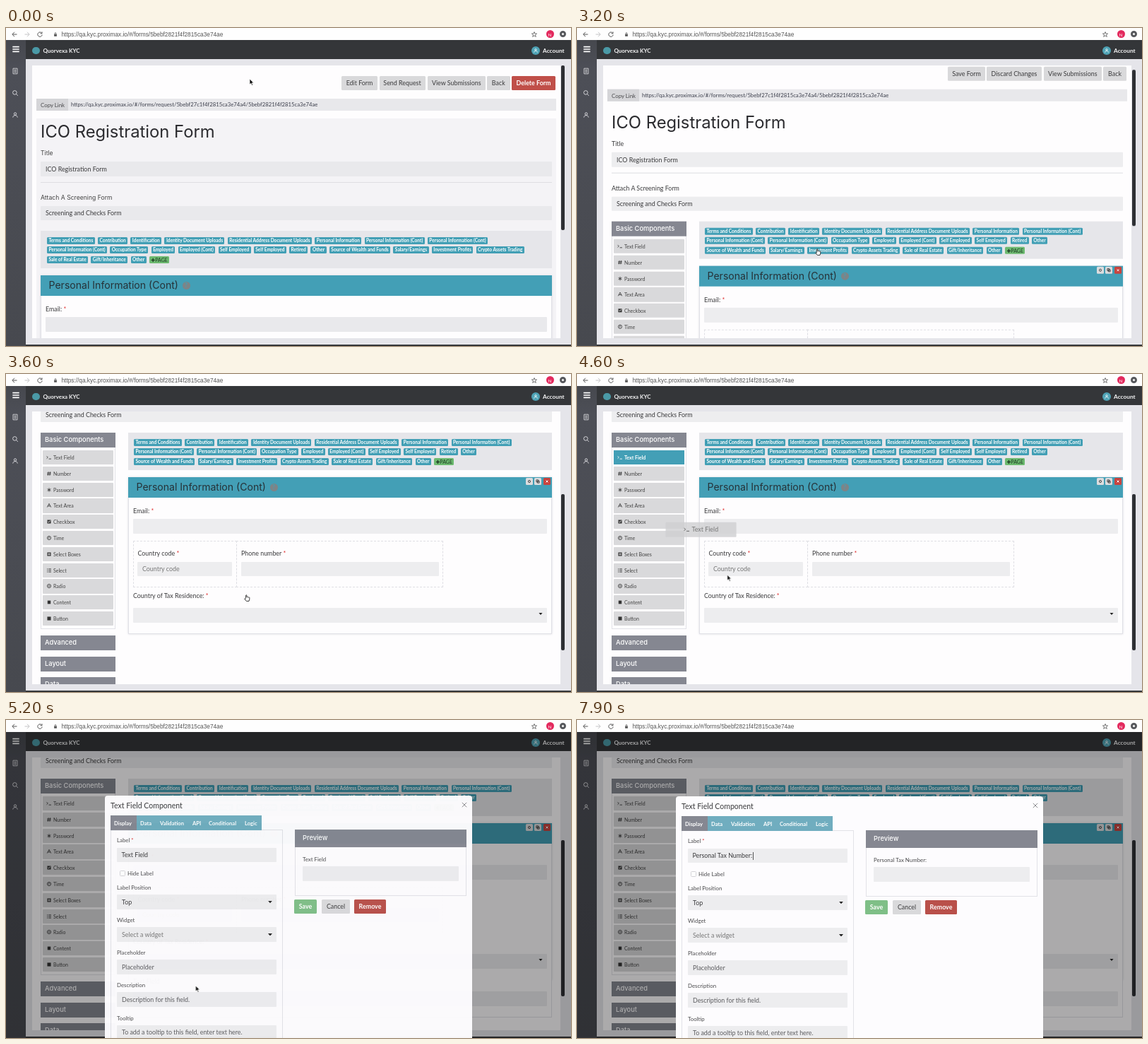
An HTML page that plays this animation: 800x450 px, repeating every 8000 ms.

```html
<!DOCTYPE html>
<html lang="en">
<head>
<meta charset="utf-8">
<title>Form builder</title>
<style>
html, body { margin: 0; width: 100%; height: 100%; overflow: hidden; background: #fff; }
#stage { position: absolute; left: 0; top: 0; width: 800px; height: 450px; overflow: hidden; font: 8.9px Lato, "Open Sans", sans-serif; color: #3a3a3c; }
#stage div, #stage span, #stage svg { position: absolute; box-sizing: border-box; }
#stage span { line-height: 20px; white-space: pre; }
svg { overflow: visible; }
.fill { left: 0; top: 0; width: 800px; height: 450px; }

.url { font: 8.29px "Liberation Sans", Arial, sans-serif; color: #555; }
.brand { font-size: 7.9px; font-weight: 700; color: #f4f4f5; }
.account { font-size: 8.3px; font-weight: 700; color: #f4f4f5; }
.link { font-size: 7.72px; color: #3c3f4c; }
.h1 { font: 23.8px Inter, "Open Sans", sans-serif; color: #2b2b2f; }
.h2 { font: 14.07px Inter, "Open Sans", sans-serif; color: #263238; }
.h3 { font: 500 9.3px Inter, "Open Sans", sans-serif; color: #fff; }
.soft { font: 8.65px Inter, "Open Sans", sans-serif; color: #444; }
.item { font-size: 7px; color: #444; }
.small { font-size: 7.87px; color: #4a4a4c; }
.tab { font-size: 7.6px; font-weight: 700; color: #fff; }
.title { font-size: 10.55px; }
.help { font-size: 8.5px; font-weight: 700; color: #439fb6; }
.hint { color: #777; }
.faint { color: #5c5c5f; }
.light { color: #fff; font-weight: 700; }
i { color: #d22; font-style: normal; }

.row { display: flex; gap: 4.3px; height: 10px; }
.row b { padding: 0 2.4px; border-radius: 1.5px; background: #429fb5; color: #fff; font-size: 6.55px; line-height: 10px; white-space: nowrap; }
.row .add { background: #6dba70; color: #1f3a24; font-weight: 400; font-size: 7px; }

#view, #edit, #hot, #added, #ghost, #arrow, #hand { animation: 8s step-end infinite; }
#view { animation-name: view; }
#edit { animation-name: edit; }
#hot { animation-name: hot; }
#added { animation-name: added; }
#ghost { animation: ghost 8s step-end infinite, drag 8s linear infinite; }
#arrow { animation-name: arrow; }
#hand { animation-name: hand; }
#scroll { animation: scroll 8s infinite; }
#thumb { animation: thumb 8s infinite, shrink 8s step-end infinite; }
#pointer { animation: pointer 8s infinite ease-in-out; }
#shade { animation: shade 8s linear infinite; }
#dialog { animation: dialog 8s infinite; }

@keyframes view { 0% { visibility: visible } 17.5%, 100% { visibility: hidden } }
@keyframes edit { 0% { visibility: hidden } 17.5%, 100% { visibility: visible } }
@keyframes hot { 0% { visibility: hidden } 52% { visibility: visible } 59.2%, 100% { visibility: hidden } }
@keyframes added { 0% { visibility: hidden } 59.2%, 100% { visibility: visible } }
@keyframes ghost { 0% { visibility: hidden } 54.4% { visibility: visible } 59.2%, 100% { visibility: hidden } }
@keyframes drag {
  0%, 54.4% { transform: none }
  57.5% { transform: translate(73px, 101px) }
  59.2%, 100% { transform: translate(150px, 215px) }
}
@keyframes arrow {
  0% { visibility: visible } 33.75% { visibility: hidden }
  47% { visibility: visible } 78.4%, 100% { visibility: hidden }
}
@keyframes hand { 0% { visibility: hidden } 33.75% { visibility: visible } 47%, 100% { visibility: hidden } }
@keyframes scroll {
  0%, 38.2% { transform: none; animation-timing-function: ease-in }
  40% { transform: translateY(-13px); animation-timing-function: cubic-bezier(.3, .2, .5, 1) }
  45%, 100% { transform: translateY(-204px) }
}
@keyframes thumb {
  0%, 38.2% { transform: none; animation-timing-function: ease-in }
  40% { transform: translateY(6px); animation-timing-function: cubic-bezier(.3, .2, .5, 1) }
  45%, 100% { transform: translateY(117px) }
}
@keyframes shrink { 0% { height: 233px } 22.5%, 100% { height: 221px } }
@keyframes pointer {
  0% { transform: translate(345px, 72px) }
  11.5%, 22.5% { transform: translate(497.5px, 79px) }
  33.75%, 46.25% { transform: translate(340px, 313px) }
  52.2%, 54.2% { transform: translate(88px, 115px); animation-timing-function: ease-in }
  57.5% { transform: translate(212px, 283px); animation-timing-function: ease-out }
  59.2%, 68.5% { transform: translate(268.5px, 376px) }
  74%, 100% { transform: translate(208px, 189px) }
}
@keyframes shade { 0%, 59.4% { opacity: 0 } 64%, 100% { opacity: 1 } }
@keyframes dialog {
  0%, 60% { opacity: 0; transform: translateY(-40px) }
  66.25%, 100% { opacity: 1; transform: none }
}
</style>
</head>
<body>
<div id="stage"></div>
<script>
const TEAL = '#439fb6', SLATE = '#858791', GREY = '#d9d9db', RED = '#c04f49';
const HASH = '5bebf2821f4f2815ca3e74ae';
const SITE = 'https://qa.kyc.proximax.io/#/forms/';
const STAR = ' <i>*</i>';
const TOP = 17; // height of the browser bar

const box = (x, y, w, h, fill, css = '', id = '') =>
  `<div id="${id}" style="left:${x}px;top:${y}px;width:${w}px;height:${h}px;background:${fill};${css}"></div>`;
// y is the middle of the line
const text = (x, y, s, cls = '', id = '') =>
  `<span class="${cls}" id="${id}" style="left:${x}px;top:${y - 10}px;line-height:20px">${s}</span>`;
const group = (id, html, css = '') => `<div id="${id}" class="fill" style="${css}">${html}</div>`;
const field = (x, y, w, s = '', cls = '', fill = '#ededef') =>
  box(x, y, w, 20.5, fill, 'border-radius:1px') + (s && text(x + 7, y + 10.5, s, cls));
const frame = (x, y, w, h, line = '1px solid #e2e2e7') => box(x, y, w, h, 'none', `border:${line}`);
const caret = (x, y) => box(x - 3, y - 1.5, 6, 3.5, '#222', 'clip-path:polygon(0 0,100% 0,50% 100%)');
const button = (x, y, w, s, fill = GREY, cls = '') =>
  box(x, y, w, 20, fill, 'border-radius:1.5px') +
  `<span class="${cls}" style="left:${x}px;top:${y}px;width:${w}px;text-align:center">${s}</span>`;
// a path that begins with ! is filled
const icon = (x, y, d, color = '#444', scale = 1, line = 1) => {
  const solid = d[0] === '!';
  return `<svg width="8" height="8" style="left:${x - 4}px;top:${y - 4}px;transform:scale(${scale})">` +
    `<path d="${solid ? d.slice(1) : d}" fill-rule="evenodd" fill="${solid ? color : 'none'}" ` +
    `stroke="${solid ? 'none' : color}" stroke-width="${line}"/></svg>`;
};

const RING = 'M4 1a3 3 0 100 6 3 3 0 100-6';
const SQUARE = 'M1 1h6v6H1z';
const PARTS = [
  ['Text Field', 'M0 2l2 2-2 2M3.5 6.5h4'],
  ['Number', 'M3 .8l-1 6.4M6 .8l-1 6.4M.8 2.8h6.4M.5 5.2h6.4'],
  ['Password', 'M4 .8v6.4M1.2 2.4l5.6 3.2M6.8 2.4L1.2 5.6'],
  ['Text Area', 'M.8 7L4 1l3.2 6M2 5h4'],
  ['Checkbox', '!' + SQUARE + 'M2 4l1.5 1.7L6.3 2.6 5.7 2 3.5 4.3 2.6 3.4z'],
  ['Time', RING + 'M4 2.3V4.2H2.8'],
  ['Select Boxes', '!' + SQUARE + 'M3.5 2v1.5H2v1h1.5V6h1V4.5H6v-1H4.5V2z'],
  ['Select', 'M.5 1.5h1.4M3 1.5h4.5M.5 4h1.4M3 4h4.5M.5 6.5h1.4M3 6.5h4.5'],
  ['Radio', RING + 'M4 3.4a.6.6 0 100 1.2.6.6 0 100-1.2'],
  ['Content', '!M1.4 1.2h5.2v5.6H1.4z'],
  ['Button', '!' + SQUARE]
];
const PERSON = 'M4 .8a1.7 1.7 0 100 3.4 1.7 1.7 0 100-3.4M.8 7.6c0-4 6.4-4 6.4 0';

const CONT = 'Personal Information (Cont)';
const PAGES = ['Terms and Conditions', 'Contribution', 'Identification', 'Identity Document Uploads',
  'Residential Address Document Uploads', 'Personal Information', CONT, CONT, CONT, 'Occupation Type',
  'Employed', 'Employed (Cont)', 'Self Employed', 'Self Employed', 'Retired', 'Other',
  'Source of Wealth and Funds', 'Salary/Earnings', 'Investment Profits', 'Crypto Assets Trading',
  'Sale of Real Estate', 'Gift/Inheritance', 'Other'];

function badges(x, cuts) {
  const ends = [...cuts, PAGES.length];
  return ends.map((end, i) => {
    const tags = PAGES.slice(ends[i - 1] || 0, end).map(p => `<b>${p}</b>`).join('');
    const add = i === 2 ? '<b class="add">✚PAGE</b>' : '';
    return `<div class="row" style="left:${x}px;top:${296 + 13.4 * i}px">${tags}${add}</div>`;
  }).join('');
}

function form(edit) {
  const x = edit ? 173 : 49, w = 773 - x;
  const label = edit ? '' : 'soft', y = edit ? 0.5 : 0;
  const fill = edit ? '#ededef' : '#e9e9ec';
  const buttons = edit
    ? [[525, 53, 'Save Form'], [580, 78, 'Discard Changes'], [660.5, 82.5, 'View Submissions'], [745, 33, 'Back']]
    : [[475, 51, 'Edit Form'], [528.5, 65, 'Send Request'], [596.5, 82.5, 'View Submissions'], [681, 32.5, 'Back'],
       [716, 62, 'Delete Form', RED, 'light']];
  return (edit ? '' : box(43, 128, 736, 520, '#f4f3f6')) +
    buttons.map(([bx, bw, ...rest]) => button(bx, 68, bw, ...rest)).join('') +
    box(43, 100, 736, 16.5, '#e8e8eb') + box(43, 100, 45, 16.5, '#d5d5d8') +
    text(49, 108.5, 'Copy Link', 'small') +
    text(92, 108, SITE + 'request/5bebf27c1f4f2815ca3e74a4/' + HASH, 'link') +
    text(49, 147, 'ICO Registration Form', 'h1') +
    text(49, 176.5 + y, 'Title', label) + field(49, 189, 724, 'ICO Registration Form', '', fill) +
    box(49, 218, 724, 1, '#dedee2') +
    text(49, 239.5 + y, 'Attach A Screening Form', label) + field(49, 251.5, 724, 'Screening and Checks Form', '', fill) +
    box(x, 287, w, 53, '#e6e6ea') + badges(x + (edit ? 8 : 9), edit ? [7, 16] : [8, 20]) +
    box(x, 349.5, w, 222, '#fefdfe', 'border:1px solid #e0e0e6;box-shadow:0 0 3px #dcdce2') +
    box(x, 349.5, w, 29.5, TEAL) + text(x + 11.5, 364, CONT, 'h2') +
    box(x + 200.5, 358.5, 11, 11, '#7d8487', 'border-radius:50%') +
    text(x + 204, 364, '?', 'help') +
    text(x + 7, 398, 'Email:' + STAR) + field(x + 7, 409, w - 14, '', '', fill);
}

function editor() {
  const tools = ['M4 1.8a2.2 2.2 0 100 4.4 2.2 2.2 0 100-4.4', 'M1 1h4v4H1zM3 3h4v4H3z', 'M2 2l4 4M6 2l-4 4'];
  return form(true) +
    tools.map((d, i) => box(736 + 12.4 * i, 351, 10, 10, i < 2 ? '#dcdcde' : '#c8433e', 'border-radius:1.5px') +
      icon(741 + 12.4 * i, 356, d, i < 2 ? '#444' : '#fff', 0.7, 1.4)).join('') +
    frame(49, 287, 106, 278) + box(49, 287, 106, 21, SLATE) + text(55, 297, 'Basic Components', 'h3') +
    PARTS.map(([name, d], i) => {
      const y = 322 + 22.8 * i;
      return box(52, y - 10, 100, 20.3, '#d9d9db', 'border-radius:1px') + icon(61, y, d, '#333', 0.85) + text(67, y, name, 'item');
    }).join('') +
    `<div id="hot">${box(52, 312, 100, 20.3, TEAL) + icon(61, 322, PARTS[0][1], '#fff', 0.85) +
      text(67, 322, '<b style="color:#fff">Text Field</b>', 'item')}</div>` +
    ['Advanced', 'Layout', 'Data'].map((s, i) =>
      box(49, 574 + 29.5 * i, 106, 21, SLATE) + text(55, 584.3 + 29.5 * i, s, 'h3')).join('') +
    frame(180, 439.5, 146.5, 66, '1px dashed #dfdfe4') + frame(326, 439.5, 293, 66, '1px dashed #dfdfe4') +
    text(186.5, 458, 'Country code' + STAR) + field(186, 469.5, 133.5, 'Country code', 'hint') +
    text(333, 458, 'Phone number' + STAR) + field(333, 469.5, 280) +
    text(180, 518, 'Country of Tax Residence:' + STAR) + field(180, 535, 586) + caret(757, 543) +
    `<div id="added">${box(173, 560, 600, 64.5, '#fefdfe', 'border:1px solid #e0e0e6;border-top:0') +
      text(180, 574, 'Text Field') + field(180, 588, 586)}</div>`;
}

function dialog() {
  const tabs = [[153, 'Display'], [190, 'Data'], [218, 'Validation'], [264, 'API'], [287, 'Conditional'], [338, 'Logic']];
  const inputs = [['Label Position', 'Top', '', true], ['Widget', 'Select a widget', 'hint', true],
    ['Placeholder', 'Placeholder', 'faint'], ['Description', 'Description for this field.', 'faint'],
    ['Tooltip', 'To add a tooltip to this field, enter text here.', 'faint']];
  return box(140, 107.5, 520, 360, '#fdfcfe', 'border-radius:4px') +
    text(148, 121.5, 'Text Field Component', 'title') +
    icon(648.5, 120.5, 'M.8 .8l6.4 6.4M7.2 .8L.8 7.2', '#8b8b8f') +
    frame(148, 156, 244, 310) +
    box(148, 136, 214, 20.5, '#70adbf') + box(148, 136, 36.5, 20.5, SLATE) +
    tabs.map(([x, s]) => text(x, 146.5, s, 'tab')).join('') +
    text(157, 171, 'Label' + STAR, 'small') + field(157, 181.5, 225.5) +
    text(163.5, 192, 'Text Field', '', 'typed') + box(0, 186.5, 1, 11, '#555', 'visibility:hidden', 'bar') +
    box(160.5, 214, 8, 8, '#fff', 'border:1px solid #d3d3d7;border-radius:1.5px') + text(172, 217.5, 'Hide Label', 'small') +
    inputs.map(([name, value, cls, pick], i) => {
      const y = 238 + 46.15 * i;
      return text(157, y, name, 'small') + field(157, y + 10, 225.5, value, cls) + (pick ? caret(374, y + 20.3) : '');
    }).join('') +
    frame(408.5, 156, 243.5, 93.5) + box(408.5, 156, 243.5, 24.5, SLATE) + text(420, 168, 'Preview', 'h3') +
    text(420, 198, 'Text Field', 'small', 'preview') + field(420, 208, 220.5) +
    button(408, 255, 32, 'Save', '#7fbf87', 'light') + button(447, 255, 40, 'Cancel') +
    button(493, 255, 45, 'Remove', '#b9504a', 'light');
}

const chrome =
  box(0, 0, 800, TOP, '#fefefe') +
  icon(12, 8.5, 'M7.5 4H1M4 .8L.8 4 4 7.2', '#555') + icon(30, 8.5, 'M.5 4H7M4 .8L7.2 4 4 7.2', '#c4c4c6') +
  icon(47.5, 8.5, 'M6.6 2.2A3.2 3.2 0 107.2 4.6M7 .4V2.8H4.6', '#555') +
  icon(70, 8.5, '!M1.8 3.6h.6V2.6a1.6 1.6 0 013.2 0v1h.6V7.2H1.8zM3.2 3.6h1.6V2.6a.8.8 0 00-1.6 0z', '#555', 0.85) +
  text(78.5, 8.5, SITE + HASH, 'url') +
  icon(748, 8.5, 'M4 .5L5 3H7.6L5.5 4.7 6.3 7.4 4 5.8 1.7 7.4 2.5 4.7 .4 3H3z', '#555', 1, 0.8) +
  box(764.5, 3, 11, 11, '#e32a5e', 'border-radius:50%') + text(767.6, 8.5, '<b style="color:#fff;font-size:6.5px;font-weight:400">N</b>') +
  box(783.5, 4, 9, 9, '#fff', 'border:3px solid #56585c;border-radius:50%');

const shell =
  box(27, TOP, 773, 450 - TOP, '#343639') + box(27, 43.5, 773, 404, '#e5e5ea') +
  box(0, TOP, 28, 450 - TOP, 'linear-gradient(#46484e,#4d4f57 40px,#47494f)') +
  icon(13.5, 30, 'M-.7 .6h9.4M-.7 4h9.4M-.7 7.4h9.4', '#fff', 1, 1.6) +
  icon(12.5, 61, 'M1 .2h6v7.6H1zM2.5 2.3h3M2.5 4h3M2.5 5.7h3', '#d6d6da', 1, 0.9) +
  icon(12.5, 92, 'M3.4 .6a2.8 2.8 0 100 5.6 2.8 2.8 0 100-5.6M5.4 5.4L7.8 7.8', '#d6d6da') +
  icon(12.5, 123, PERSON, '#d6d6da') +
  box(37, 26.5, 10.5, 10.5, '#4a99a6', 'border-radius:50%') + text(52.5, 31.5, 'Quorvexa KYC', 'brand') +
  box(744, 26, 12, 12, '#4fa3b5', 'border-radius:50%') + icon(750, 32, PERSON, '#fff', 0.75) +
  text(760, 32, 'Account', 'account') +
  box(37, 53, 748, 385.5, '#fefdfe') +
  group('clip', group('scroll', group('view', form(false)) + group('edit', editor())), 'clip-path:inset(53px 15px 11.5px 37px)') +
  box(785.5, 53, 5.5, 233, '#2e3034', 'border-radius:2px', 'thumb');

const ghost =
  box(52, 108, 100, 20.5, '#cfcfd1', 'opacity:.8;border-radius:1px') +
  icon(82, 118, PARTS[0][1], '#666') + text(89, 118, 'Text Field', 'hint');

const pointer =
  '<svg id="arrow" width="8" height="11"><path d="M0 0V8L1.9 6.3 3.2 9.2 4.5 8.6 3.2 5.8H5.7Z" fill="#111" stroke="#fff" stroke-width=".7"/></svg>' +
  '<svg id="hand" width="9" height="10" style="left:-3px;top:-1px"><path d="M2.6 5.4V1.2q.7-1 1.4 0V3.8q.7-.6 1.3 0 .7-.5 1.3.2 1-.4 1.2.5V6.6L7 9.4H3.4L.6 6.2q.5-1.2 2 .2" fill="#fff" stroke="#222" stroke-width=".9"/></svg>';

document.getElementById('stage').innerHTML =
  shell + group('shade', '', 'background:rgba(0,0,0,.33)') + group('ghost', ghost) +
  group('dialog', dialog()) + chrome + `<div id="pointer" style="left:0;top:0">${pointer}</div>`;

// Typing into the label field
const ANSWER = 'Personal Tax Number:', SELECT = 6000, TYPE = 6270, KEY = 82;
const [typed, preview, bar] = ['typed', 'preview', 'bar'].map(id => document.getElementById(id));
let start;
function tick(now) {
  start ??= now;
  const t = (now - start) % 8000;
  const value = t < TYPE ? 'Text Field' : ANSWER.slice(0, Math.floor((t - TYPE) / KEY) + 1);
  if (typed.textContent !== value) typed.textContent = preview.textContent = value;
  typed.style.background = t >= SELECT && t < TYPE ? 'linear-gradient(#b5d5fb,#b5d5fb) 0 50%/100% 11px no-repeat' : '';
  bar.style.visibility = t >= TYPE ? 'visible' : 'hidden';
  bar.style.left = 163.5 + typed.offsetWidth + 'px';
  requestAnimationFrame(tick);
}
requestAnimationFrame(tick);
</script>
</body>
</html>
```
